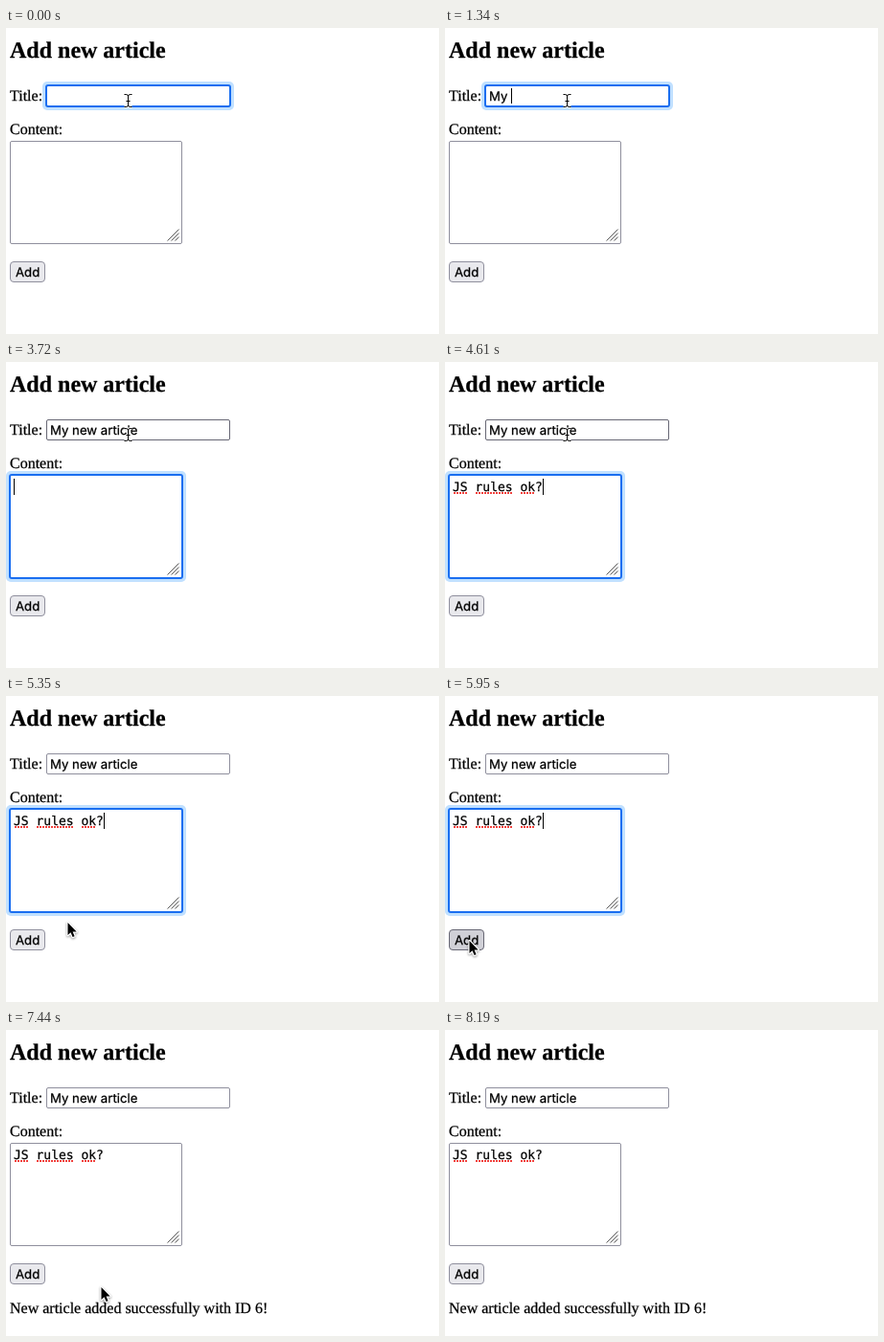
An HTML page for the animation above (8640 ms loop, 452 px wide and 320 px high).

```html
<!DOCTYPE html>
<html lang="en">
<head>
<meta charset="utf-8">
<title>Add new article</title>
<style>
  html, body { margin: 0; width: 100%; height: 100%; overflow: hidden; background: #fff; }
  svg { display: block; width: 452px; height: 320px; }
  text {
    font: 16px "Liberation Serif", serif; white-space: pre;
    stroke: #000; stroke-width: .25; text-rendering: geometricPrecision;
  }
  .head { font: bold 24px "Liberation Serif", serif; }
  .ui { font: 13.2px Inter, sans-serif; }
  .mono { font: 13px "DejaVu Sans Mono", monospace; }
  .box { fill: #fff; stroke: #8f8f9d; }
  .hover { stroke: #676774; }
  .ring { fill: #c0e0ff; }
  .focus { fill: #fff; stroke: #1a6ef0; stroke-width: 2; }
  #button { fill: #e9e9ed; }
  #button.hover { fill: #d0d0d7; }
  #button.active { fill: #b1b1b9; stroke: #484851; }
  .spell { stroke: #f0403c; stroke-width: 2; stroke-dasharray: 2 1; }
  .halo { fill: none; stroke: #fff; stroke-width: 2.5; stroke-linejoin: round; }
  .line { fill: none; stroke: #000; }
  #arrow { filter: drop-shadow(0 1px 1px #0006); }
</style>
</head>
<body>
<svg viewBox="0 0 452 320">
  <defs>
    <path id="beamShape" d="M-3.5-6.5h2q2 0 2 2q0-2 2-2h2M.5-5V5M-3.5 6.5h2q2 0 2-2q0 2 2 2h2M-1.5.5h4"/>
    <path id="arrowShape" d="M.5 1V14L3.5 11.2L5.6 16L7.6 15.2L5.6 10.4H9.7Z"/>
  </defs>

  <text class="head" x="4" y="31">Add new article</text>
  <text x="4" y="76">Title:</text>
  <text x="4" y="111">Content:</text>

  <rect id="title" class="box" x="42.5" y="60.5" width="191" height="21" rx="1.5"/>
  <g id="titleFocus">
    <rect class="ring" x="38" y="56" width="200" height="30" rx="5"/>
    <rect class="focus" x="42" y="60" width="192" height="22" rx="2"/>
  </g>
  <text id="titleText" class="ui" x="46" y="76"></text>

  <rect class="box" x="4.5" y="118.5" width="179" height="107" rx="1.5"/>
  <g id="areaFocus">
    <rect class="ring" x="0" y="114" width="188" height="116" rx="5"/>
    <rect class="focus" x="4" y="118" width="180" height="108" rx="2"/>
  </g>
  <path class="line" d="M168.5 222.5l12-12m-8 12l8-8m-4 8l4-4" opacity=".65"/>
  <g id="areaText">
    <text class="mono" x="8" y="135">JS rules ok?</text>
    <path class="spell" d="M9 137h15M32 137h39M79 137h15"/>
  </g>
  <rect id="caret" width="1"/>

  <rect id="button" class="box" x="4.5" y="244.5" width="36" height="21" rx="3.5"/>
  <text class="ui" x="10" y="260">Add</text>
  <text id="message" x="4" y="296">New article added successfully with ID 6!</text>

  <g id="beam"><use href="#beamShape" class="halo"/><use href="#beamShape" class="line"/></g>
  <g id="arrow"><use href="#arrowShape" class="halo"/><use href="#arrowShape"/></g>
</svg>
<script>
const LOOP = 8640, TICK = 148.6;  // the screen refreshes once per tick
const FIRST_KEY = 6;              // tick of the first keystroke
const keys = "M||y| ||n|e|w| |a|r||t|ic||l|e".split("|");  // one entry per tick

const $ = id => document.getElementById(id);
const show = (id, on) => $(id).style.display = on ? "" : "none";
const within = (x, y, l, t, r, b) => x >= l && x < r && y >= t && y < b;
const progress = (tick, start, steps) => Math.min(1, Math.max(0, (tick - start) / steps));
const curve = (a, b, c, u) => (1 - u) ** 2 * a + 2 * u * (1 - u) * b + u * u * c;

// From the title field to the button, slowing down, then straight off the stage
function pointer(tick) {
  const u = 1 - (1 - progress(tick, 32, 8)) ** 2;
  const leave = progress(tick, 49, 6);
  return [
    curve(127, 112, 25, u) + 446 * leave,
    curve(76, 234, 255, u) + 75 * leave
  ];
}

function draw(tick) {
  const [x, y] = pointer(tick);
  const inTitle = tick < 25, inArea = !inTitle && tick < 41, filled = tick >= 31;

  const title = $("titleText");
  title.textContent = keys.slice(0, Math.max(0, tick - FIRST_KEY + 1)).join("");
  show("titleFocus", inTitle);
  show("areaFocus", inArea);
  show("areaText", filled);
  show("message", tick >= 42);

  const caret = $("caret");
  const titleEnd = Math.round(46 + title.getComputedTextLength());
  caret.setAttribute("x", inTitle ? titleEnd : filled ? 102 : 8);
  caret.setAttribute("y", inTitle ? 63 : 122);
  caret.setAttribute("height", inTitle ? 16 : 17);
  const blinkedOff = tick < 4 || (tick >= 29 && !filled);
  show("caret", (inTitle || inArea) && !blinkedOff);

  const overTitle = within(x, y, 42, 60, 234, 82);
  const overArea = within(x, y, 4, 118, 184, 226);
  $("title").classList.toggle("hover", overTitle);
  $("button").classList.toggle("hover", within(x, y, 4, 244, 41, 266));
  $("button").classList.toggle("active", tick === 41);

  const overText = overTitle || overArea;
  show("beam", overText);
  show("arrow", !overText);
  $(overText ? "beam" : "arrow").setAttribute("transform", `translate(${Math.round(x)} ${Math.round(y)})`);
}

function frame() {
  draw(Math.floor(performance.now() % LOOP / TICK));
  requestAnimationFrame(frame);
}
frame();
</script>
</body>
</html>
```
